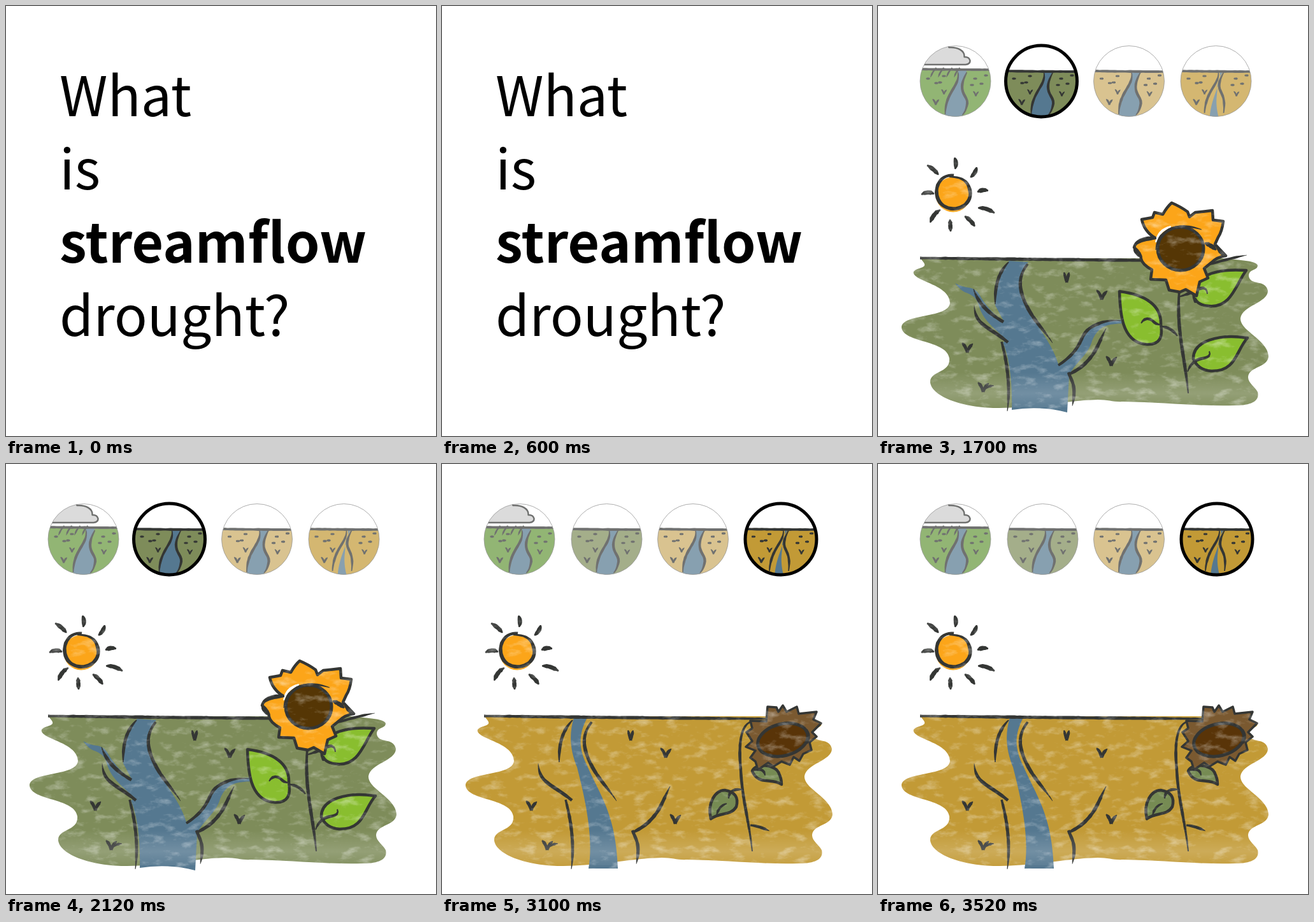
Write an HTML page that moves like this. It is 675x675 px and loops after 3800 ms.

```html
<!DOCTYPE html>
<html lang="en">
<head>
<meta charset="utf-8">
<title>Streamflow drought</title>
<style>
  html, body { margin: 0; width: 100%; height: 100%; overflow: hidden; background: #fff; }
  svg { display: block; width: 100%; height: 100%; }
  text { font: 400 86px "Source Sans Pro", "Noto Sans CJK JP", "Noto Sans CJK SC", "Noto Sans CJK", "Noto Sans", sans-serif; }
  .bold { font-weight: 700; }
</style>
</head>
<body>
<svg id="stage" viewBox="0 0 675 675" xmlns="http://www.w3.org/2000/svg"></svg>
<script>
const INK = '#343634';
const RIVER = '#557890';
const LANDS = ['#65963a', '#7e8c5a', '#c9ab62', '#c29a36'];
const STEPS = [1000, 700, 700, 700, 700];
const LOOP = STEPS.reduce((a, b) => a + b);

let seed = 7;
const rand = () => (seed = seed * 16807 % 2147483647) / 2147483647;
const probe = document.createElementNS('http://www.w3.org/2000/svg', 'path');

// Brush stroke along a path; t0 and t1 set how blunt its ends are.
function ink(d, w = 5, t0 = .4, t1 = .4, color = INK) {
  probe.setAttribute('d', d);
  const len = probe.getTotalLength(), n = Math.max(8, Math.round(len / 4));
  const left = [], right = [];
  for (let i = 0; i <= n; i++) {
    const s = i / n, at = len * s;
    const p = probe.getPointAtLength(at);
    const a = probe.getPointAtLength(Math.max(0, at - 1));
    const b = probe.getPointAtLength(Math.min(len, at + 1));
    const dx = b.x - a.x, dy = b.y - a.y, m = Math.hypot(dx, dy) || 1;
    const ends = Math.min(1, t0 + (1 - t0) * s * 4, t1 + (1 - t1) * (1 - s) * 4);
    const r = w / 2 * ends * (.9 + .2 * rand());
    left.push((p.x - dy / m * r).toFixed(1) + ' ' + (p.y + dx / m * r).toFixed(1));
    right.unshift((p.x + dy / m * r).toFixed(1) + ' ' + (p.y - dx / m * r).toFixed(1));
  }
  return `<path d="M${left.concat(right).join('L')}Z" fill="${color}"/>`;
}
const fill = (d, color) => `<path d="${d}" fill="${color}"/>`;
const shape = (d, color, w = 4.5) =>
  `<path d="${d}" fill="${color}" stroke="${INK}" stroke-width="${w}" stroke-linejoin="round"/>`;
const on = (steps, body) => `<g data-on="${steps}">${body}</g>`;

const LAND = `M67 396C71 403 77 406 70 410C62 413 54 415 56 420C61 433 112 438 113 466
  C111 491 37 482 37 505C40 529 108 524 112 553C114 577 81 572 82 591C85 615 140 632 190 631
  C250 630 300 619 345 618C362 618 370 622 385 621C450 622 510 629 560 627C590 627 599 618 596 606
  C592 597 577 590 582 578C588 566 612 566 613 550C612 524 568 510 569 490C572 470 612 466 612 447
  C608 428 585 440 582 424C582 412 596 416 596 407C592 399 565 399 540 396Z`;

const STREAM = `M206 400C188 420 183 440 184 470L197 494C180 483 172 473 162 458Q155 443 142 442Q132 441 121 435
  Q130 448 141 451Q152 455 157 466C163 490 175 500 203 525L196 528C208 556 211 600 210 634
  Q255 627 297 638L300 580C309 560 330 548 336 526Q344 504 365 500Q390 496 416 500Q390 489 360 494
  C325 499 324 512 320 527C315 542 300 550 283 562C272 525 245 500 232 468C221 440 222 420 236 402Z`;
const TRICKLE = `M207 398H228C213 427 215 448 228 474C248 520 273 550 276 635H230
  C238 590 226 530 212 476C201 450 199 424 207 398Z`;

const tuft = (x, y, s = 1) =>
  ink(`M${x - 8 * s} ${y - 8 * s}Q${x - 2 * s} ${y - 3 * s} ${x} ${y + 7 * s}`, 5 * s, .4, .8) +
  ink(`M${x + 9 * s} ${y - 7 * s}Q${x + 2 * s} ${y - 1 * s} ${x} ${y + 7 * s}`, 5 * s, .2, .9);

function banks() {
  return ink('M205 402C189 418 183 440 184 468', 5, .4, .3) +
    ink('M235 405C220 424 220 442 232 468C245 495 262 510 274 529', 5.5, .6, .1) +
    ink('M151 470C153 502 170 500 204 528', 5.5, .1, .8) +
    ink('M194 527C200 550 209 590 203 636', 5, .7, .2) +
    ink('M358 506C345 530 340 560 298 579', 5.5, .2, .8) +
    ink('M299 575C304 590 312 595 305 628', 5, .9, .1);
}
function branchBanks() {
  return ink('M150 444C158 470 178 485 197 496', 5.5, .2, .8) +
    ink('M283 564C330 533 310 514 343 500Q360 492 381 494', 5, .8, .2);
}
const tufts = () =>
  ink('M292 418L296 434', 4, .4, .8) + ink('M300 418L296 434', 5, .2, .9) +
  tuft(351, 454) + tuft(366, 558) + tuft(140, 537) + tuft(165, 599) +
  ink('M182 596Q172 596 163 604', 4, .2, .9);

function sun() {
  const rays = ['M120 238Q124 246 121 256', 'M77 250Q87 255 95 265', 'M68 296Q78 290 88 295',
    'M82 340Q87 325 98 320', 'M114 354L113 335', 'M136 330Q145 335 152 346',
    'M157 317Q170 316 183 325', 'M156 292Q165 287 173 290', 'M155 253Q153 263 145 269'];
  return '<circle cx="118" cy="296" r="27.5" fill="#fca519"/>' +
    ink('M119 266C95 263 85 291 97 308C112 327 145 318 145 294C143 276 134 268 112 268', 5.5, .8, .4) +
    rays.map(d => ink(d, 6.5, .3, .3)).join('');
}

function cloud() {
  const d = `M135 357C122 357 116 357 109 353C92 342 96 321 117 320C110 285 130 242 190 255
    C207 220 262 215 281 263C330 253 369 283 363 322C386 316 399 328 398 343C395 355 386 357 365 357`;
  const rain = ['M165 355Q152 378 147 400', 'M214 357C190 385 186 410 181 440', 'M259 361Q248 374 243 393',
    'M307 363C282 385 268 420 262 455', 'M357 364Q344 373 338 388'];
  return fill(d + 'Z', '#cdcdcd') + ink(d, 6, .5, .6, '#404142') + ink('M120 356L372 358', 3, .4, .6) +
    rain.map(r => ink(r, 5, .9, .1)).join('');
}

const disc = (x, y, rx, ry, turn, color) =>
  `<ellipse cx="${x}" cy="${y}" rx="${rx}" ry="${ry}" transform="rotate(${turn} ${x} ${y})"
    fill="${color}" stroke="${INK}" stroke-width="5"/>`;

function freshFlower() {
  const leaf = '#89be2f';
  return ink('M510 409Q550 396 579 391', 4, .3, .1) +
    ink('M473 446C468 510 481 545 487 608', 5, .7, .4) +
    shape('M379 448C380 480 382 527 420 531C444 533 447 518 444 500C445 470 420 453 379 448Z', leaf) +
    ink('M413 498Q420 486 431 494Q440 503 445 499', 4.5) + ink('M444 503Q460 504 470 518', 4.5) +
    shape('M498 464C488 440 505 410 578 415C562 436 555 474 520 471Q503 470 498 460Z', leaf) +
    ink('M474 456Q488 452 502 445Q516 438 517 452', 4.5) +
    shape('M495 554C494 526 535 514 580 521C562 540 563 574 523 573Q503 572 495 554Z', leaf) +
    ink('M486 574Q492 556 510 553Q524 551 520 542', 4.5) +
    shape(`M414 335L431 332L434 324L447 327Q454 315 461 309Q475 315 486 323L489 331L498 324L525 321L526 336
      L542 338Q540 354 534 363L529 374L546 392Q532 394 523 403L512 412L518 427L505 433L500 455L483 445
      L474 449L457 446L452 430L428 429L430 414Q415 406 413 397Q413 388 402 379Q405 367 424 364L435 364
      Q418 354 414 335Z`, '#fca519') +
    '<path d="M437 371Q440 351 460 347" fill="none" stroke="#fff" stroke-width="4"/>' +
    disc(475, 381, 36, 34, 0, '#553605') +
    ink('M436 383C438 352 471 338 508 351', 4, .3, .2) +
    ink('M513 372Q524 376 531 383', 7, .4, .3) +
    ink('M402 379Q405 366 437 365', 5) + ink('M414 394Q404 389 402 379', 5) +
    ink('M531 375Q536 390 546 392', 4);
}

function tiredFlower() {
  const leaf = '#768b53';
  return ink('M545 396Q562 396 579 391', 4, .3, .1) +
    ink('M472 452C468 510 480 545 487 608', 5, .7, .4) +
    shape('M394 557C400 525 412 508 437 508Q468 512 463 534C455 558 430 556 394 557Z', leaf) +
    ink('M430 534C426 520 447 513 470 510', 4.5) +
    shape('M493 472C494 447 532 439 548 456Q560 466 566 488C537 482 501 494 493 472Z', leaf) +
    ink('M474 458Q490 454 500 461Q519 460 515 475', 4.5) +
    shape('M498 553C494 533 522 531 540 544Q553 560 560 579C535 575 503 577 498 553Z', leaf) +
    ink('M485 580Q486 560 505 552Q519 551 514 565', 4.5) +
    shape(`M459 352L474 350L481 355L487 347L504 341L511 348L523 341L540 336L541 352L554 353L546 372L541 379
      L548 394L539 402L545 419L523 426L520 447L506 442L497 455L478 458L472 438L452 437L456 420L446 407
      L442 389L466 383L468 369Z`, '#fdc27b', 4) +
    ink('M441 391Q449 384 468 383', 5) + ink('M458 352Q469 347 481 355', 5) +
    ink('M488 347Q503 338 511 347', 4) +
    disc(497, 398, 38, 27, -40, '#553605');
}

function deadFlower() {
  const leaf = '#768b53';
  return ink('M494 404C468 400 465 440 469 480C471 525 482 560 487 608', 4.5, .5, .4) +
    ink('M484 567Q497 568 514 576', 4.5, .7, .1) +
    shape('M422 557C416 532 429 512 444 512Q468 516 462 538C453 553 437 546 422 557Z', leaf) +
    ink('M431 551Q435 536 447 533', 4) + ink('M450 525Q450 509 471 511', 4.5) +
    shape('M487 482C492 468 525 472 529 486Q533 494 533 503C518 492 496 505 487 482Z', leaf) +
    ink('M489 481Q506 476 507 489', 4) +
    shape(`M511 381L525 382L528 389L535 379L541 389L557 381L560 392L588 389L583 401L595 407L581 421
      L588 428L577 437L580 449L567 455L561 466L552 460L546 472L533 467L520 475L512 469L496 480L492 467
      L484 461L492 450L477 444L487 435L478 421L487 415L484 403L509 404Z`, '#7a5930', 3.5) +
    disc(535, 433, 40, 25, -14, '#593408') +
    ink('M566 414Q580 421 573 439', 5);
}

function thumbArt(i) {
  const dry = i === 3, top = i ? -16 : -19;
  const leftBank = dry ? 'M4 -14C5 6 -16 14 -18 50' : 'M4 -14C8 8 -16 16 -16 52';
  const rightBank = dry
    ? 'M12 -14C8 -5 3 2 6 13C10 22 15 28 12 50'
    : 'M18 -14C13 -4 9 4 11 14C13 24 21 28 18 38Q16 48 11 53';
  const water = dry
    ? 'M6 -15C10 5 -8 22 -10 60H5C-3 30 3 22 2 8Q4 -4 11 -15Z'
    : 'M4 -17C8 8 -16 16 -16 60H11L11 53Q16 48 18 38C21 28 13 24 11 14C9 4 13 -4 18 -17Z';
  const dashes = [[-43, -4], [-30, 3], [-18, -8], [-24, 2], [31, -4], [26, 6], [41, 4], [48, -9]];
  let art = `<rect x="-60" y="${top}" width="120" height="80" fill="${LANDS[i]}"/>` + fill(water, RIVER);
  art += ink(leftBank, 4) + ink(rightBank, 4);
  art += ink(`M-58 ${top}Q0 ${top + 1} 58 ${top + 1}`, 4, .9, .9);
  art += dashes.map(([x, y]) => ink(`M${x - 3} ${y}L${x + 3} ${y}`, 3.2, .6, .6)).join('');
  art += tuft(-18, 17, .5) + tuft(-31, 33, .6) + tuft(32, 20, .5);
  if (!i) {
    art += shape('M-58 -26H16C27 -27 24 -39 14 -38C15 -48 3 -54 -10 -53L-12 -62H-70V-26Z', '#ccc', 2.5);
    art += [-36, -24, -11, 1].map(x => ink(`M${x + 6} -21Q${x} -15 ${x - 3} -6`, 2.5, .8, .2)).join('');
  }
  return art;
}

function thumb(i) {
  const idle = [121.5, 258.5, 394, 530.5][i], active = [119, 256.5, 393, 532][i];
  const art = `<g clip-path="url(#round)">${thumbArt(i)}</g>`;
  const others = [1, 2, 3, 4].filter(s => s !== i + 1).join('');
  return on(others, `<g transform="translate(${idle} 118)"><g opacity=".7">${art}</g>
      <circle r="55.5" fill="none" stroke="#999" stroke-width=".8"/></g>`) +
    on(i + 1, `<g transform="translate(${active} 118)">${art}
      <circle r="56" fill="none" stroke="#000" stroke-width="5"/></g>`);
}

const title = ['What', 'is', 'streamflow', 'drought?'].map((word, i) =>
  `<text x="84" y="${173 + i * 115}"${i === 2 ? ' class="bold"' : ''}>${word}</text>`).join('');

const defs = `<defs>
  <clipPath id="round"><circle r="55.5"/></clipPath>
  <linearGradient id="wash" x1="0" y1="0" x2="0" y2="1">
    <stop offset="0" stop-color="#fff" stop-opacity="0"/>
    <stop offset=".6" stop-color="#fff" stop-opacity=".17"/>
    <stop offset="1" stop-color="#fff" stop-opacity=".05"/>
  </linearGradient>
  <filter id="grain" x="0" y="0" width="1" height="1" color-interpolation-filters="sRGB">
    <feTurbulence type="fractalNoise" baseFrequency=".04 .08" numOctaves="5" seed="5"/>
    <feColorMatrix values="0 0 0 0 1  0 0 0 0 1  0 0 0 0 1  1 0 0 0 -.52"/>
  </filter></defs>`;

const stage = document.getElementById('stage');
stage.innerHTML = defs + on('0', title) +
  [0, 1, 2, 3].map(thumb).join('') +
  LANDS.map((color, i) => on(i + 1, fill(LAND, color))).join('') +
  on('123', fill(STREAM, RIVER)) + on('4', fill(TRICKLE, RIVER)) +
  on('1234', ink('M66 395.5Q250 398 515 400', 5, .8, .6) + banks() + tufts() + sun()) +
  on('123', branchBanks()) +
  on('1', cloud()) + on('12', freshFlower()) + on('3', tiredFlower()) + on('4', deadFlower()) +
  on('1234', `<rect x="30" y="225" width="590" height="416" filter="url(#grain)"/>
    <rect x="30" y="575" width="590" height="55" fill="url(#wash)"/>`);

const parts = [...stage.querySelectorAll('[data-on]')];
let shown = -1;
function show(step) {
  if (step === shown) return;
  shown = step;
  for (const p of parts) p.style.display = p.dataset.on.includes(step) ? '' : 'none';
}

const start = performance.now();
function tick() {
  let t = (performance.now() - start) % LOOP, step = 0;
  while (t >= STEPS[step]) t -= STEPS[step++];
  show(step);
  requestAnimationFrame(tick);
}
tick();
</script>
</body>
</html>
```
